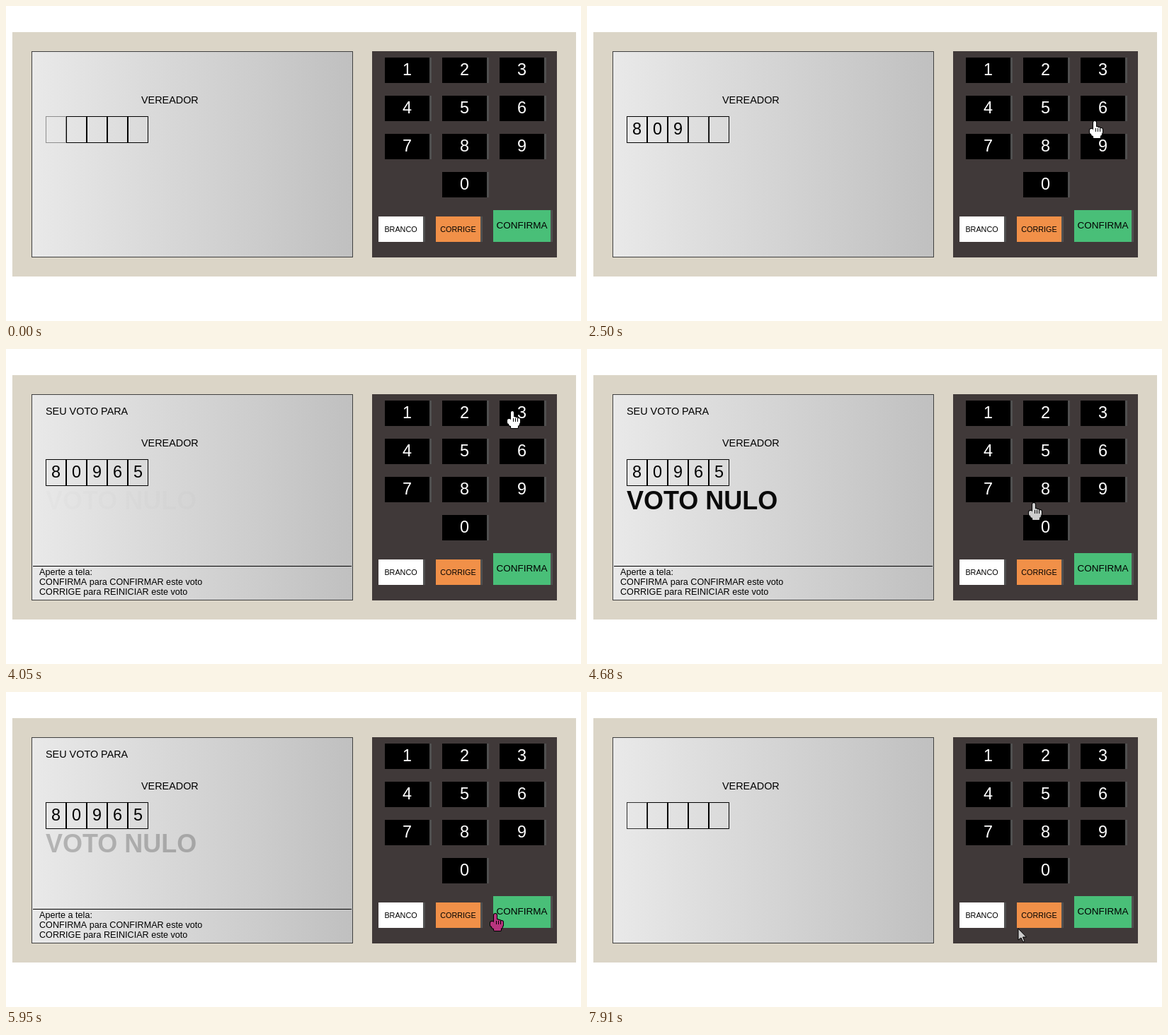
These frames come from a looping animation (812x446 px, 7.99 s). An HTML page with a canvas:

```html
<!DOCTYPE html>
<html lang="pt-BR">
<head>
<meta charset="utf-8">
<title>Urna</title>
<style>
html, body { margin: 0; width: 100%; height: 100%; overflow: hidden; background: #fff; }
canvas { display: block; }
</style>
</head>
<body>
<canvas id="stage" width="812" height="446"></canvas>
<script>
const ctx = document.getElementById('stage').getContext('2d', { alpha: false });
const FONT = '"Liberation Sans", Arial, sans-serif';
const LOOP = 7990;
const BLINK = 1050;
const CLEAR = 7302;

const VOTE = '80965';
const pressTime = i => 1430 + i * 411;
const DONE = pressTime(VOTE.length - 1);

// Keypad: ten digits on a 3-column grid, then three command keys
const digitKey = n => {
  const slot = n ? n - 1 : 10;
  return {
    x: 535 + slot % 3 * 81, y: 73 + Math.floor(slot / 3) * 54, w: 63, h: 36,
    label: String(n), fill: '#000', ink: '#fff', size: 23.4, base: 25
  };
};
const digits = Array.from({ length: 10 }, (_, n) => digitKey(n));
const command = { y: 298, w: 63, h: 36, ink: '#000', size: 10.8, base: 22 };
const keys = [
  ...digits,
  { ...command, x: 526, label: 'BRANCO', fill: '#fff' },
  { ...command, x: 607, label: 'CORRIGE', fill: '#f19048' },
  { ...command, x: 688, y: 289, w: 81, h: 45, label: 'CONFIRMA', fill: '#49bf78', size: 13.5, base: 26, tint: '#b8357f' }
];

// Pointer stops: time, x, y
const stops = [
  [0, 733, 447],
  [690, 638, 206],
  ...[...VOTE].map((d, i) => [pressTime(i), digits[d].x + 19, digits[d].y + 17]),
  [3350, 641, 77],
  [4050, 714, 88],
  [4680, 630, 217.5],
  [4820, 640, 241],
  [5420, 752, 205],
  [5950, 690, 314],
  [6510, 636, 329],
  [6790, 654, 324],
  [7330, 652, 326],
  [7910, 609, 335]
];

function rect(x, y, w, h, fill) {
  ctx.fillStyle = fill;
  ctx.fillRect(x, y, w, h);
}

function frame(x, y, w, h, color) {
  ctx.strokeStyle = color;
  ctx.lineWidth = 1;
  ctx.strokeRect(x + .5, y + .5, w - 1, h - 1);
}

function text(str, x, y, size, color = '#000', align = 'left', weight = '') {
  ctx.font = `${weight} ${size}px ${FONT}`;
  ctx.textAlign = align;
  ctx.fillStyle = color;
  ctx.fillText(str, x, y);
}

// CSS "ease": cubic-bezier(.25, .1, .25, 1)
function ease(x) {
  const bezier = (s, a, b) => 3 * s * (1 - s) * ((1 - s) * a + s * b) + s ** 3;
  let lo = 0, hi = 1;
  for (let i = 0; i < 18; i++) {
    const mid = (lo + hi) / 2;
    if (bezier(mid, .25, .25) < x) lo = mid; else hi = mid;
  }
  return bezier(lo, .1, 1);
}

// Opacity 0 -> 1 -> 0, each half eased
function blink(age, period = BLINK) {
  const half = age / period % 1 * 2;
  return half < 1 ? ease(half) : 1 - ease(half - 1);
}

function boxes(t) {
  const count = t < CLEAR ? [...VOTE].filter((_, i) => t >= pressTime(i)).length : 0;
  for (let i = 0; i < VOTE.length; i++) {
    const x = 56 + i * 29;
    if (i === count) {
      if (t >= CLEAR) ctx.globalAlpha = blink(t - CLEAR);
      else ctx.globalAlpha = i ? blink(t - pressTime(i - 1)) : blink(t + 650, 960);
    }
    frame(x, 156, 29, 38, '#000');
    ctx.globalAlpha = 1;
    if (i < count) text(VOTE[i], x + 14.5, 182, 23.4, '#000', 'center');
  }
}

function screen(t) {
  const shade = ctx.createLinearGradient(37, 0, 489, 0);
  shade.addColorStop(0, '#e9e9e9');
  shade.addColorStop(1, '#c0c0c0');
  rect(36, 64, 454, 292, shade);
  frame(36, 64, 454, 292, '#404040');
  text('VEREADOR', 191, 138, 14.4);
  boxes(t);
  if (t < DONE || t >= CLEAR) return;
  text('SEU VOTO PARA', 56, 93, 14.4);
  ctx.globalAlpha = blink(t - DONE);
  text('VOTO NULO', 56, 227, 36, '#000', 'left', 'bold');
  ctx.globalAlpha = 1;
  rect(38, 307, 450, 1, '#000');
  ['Aperte a tela:', 'CONFIRMA para CONFIRMAR este voto', 'CORRIGE para REINICIAR este voto']
    .forEach((line, i) => text(line, 47, 320 + i * 14, 12.6));
}

function keypad() {
  rect(517, 64, 261, 292, '#403939');
  for (const k of keys) {
    rect(k.x, k.y, k.w, k.h, k.fill);
    rect(k.x + k.w, k.y, 3, k.h, '#505050');
    text(k.label, k.x + k.w / 2, k.y + k.base, k.size, k.ink, 'center');
  }
}

function pointerAt(t) {
  const next = stops.findIndex(s => s[0] > t);
  if (next < 0) return stops[stops.length - 1].slice(1);
  const [t0, x0, y0] = stops[next - 1], [t1, x1, y1] = stops[next];
  const u = (t - t0) / (t1 - t0), s = u * u * (3 - 2 * u);
  return [x0 + (x1 - x0) * s, y0 + (y1 - y0) * s];
}

function hand(x, y, fill) {
  const pad = new Path2D();
  pad.roundRect(x - 1, y, 4, 16, 2);
  for (let i = 0; i < 3; i++) pad.roundRect(x + 2 + i * 3, y + 8 + i, 4, 8, 2);
  pad.roundRect(x - 6, y + 11, 5, 7, 2);
  pad.roundRect(x - 4, y + 13, 15, 8, 3);
  pad.roundRect(x - 1, y + 18, 10, 6, 1);
  ctx.lineWidth = 2;
  ctx.stroke(pad);
  ctx.fillStyle = fill;
  ctx.fill(pad);
  for (let i = 0; i < 3; i++) rect(x + 2 + i * 3, y + 10, 1, 5, '#000');
}

function arrow(x, y, fill) {
  const outline = new Path2D(`M${x} ${y}v16l4-3 3 6 2-1-2.5-6h5z`);
  ctx.lineWidth = 1;
  ctx.fillStyle = fill;
  ctx.fill(outline);
  ctx.stroke(outline);
}

function pointer(t) {
  const [px, py] = pointerAt(t);
  const x = Math.round(px), y = Math.round(py);
  const under = keys.find(k => px > k.x && px < k.x + k.w + 3 && py > k.y && py < k.y + k.h + .8);
  const fill = t < DONE + BLINK ? '#fff' : '#cdcdcd';
  ctx.strokeStyle = '#000';
  if (under) hand(x, y, under.tint || fill);
  else arrow(x, y, fill);
}

function draw(now) {
  const t = Math.max(0, now - start) % LOOP;
  rect(0, 0, 812, 446, '#fff');
  rect(9, 37, 796, 346, '#dbd5c7');
  screen(t);
  keypad();
  pointer(t);
  requestAnimationFrame(draw);
}

const start = performance.now();
draw(start);
</script>
</body>
</html>
```
